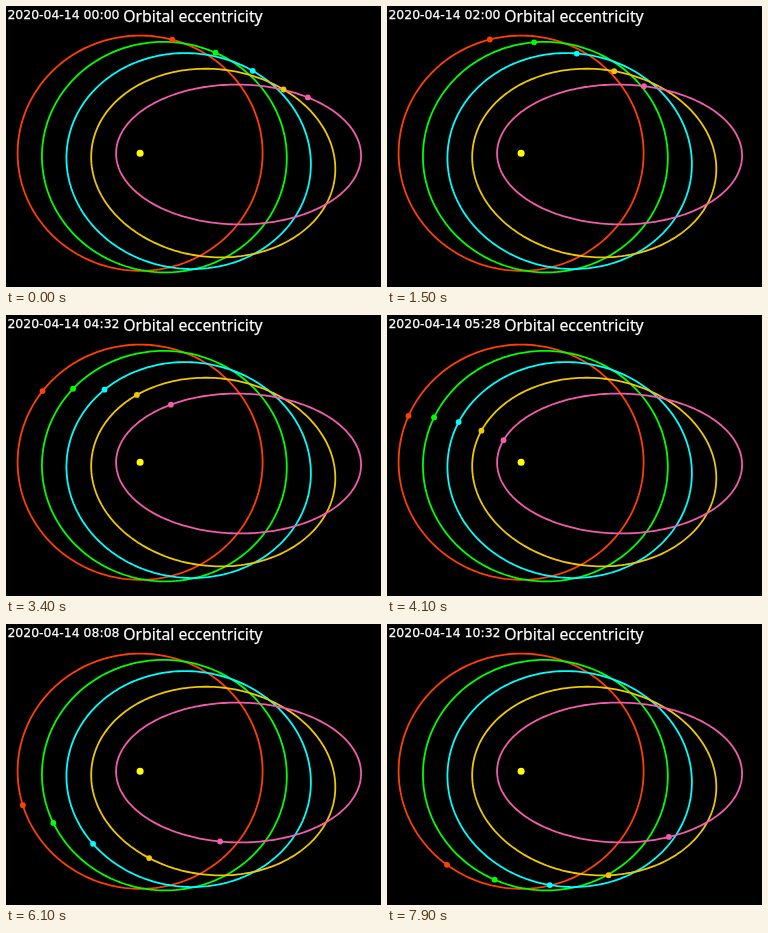
Write an HTML page that moves like this. It is 375 by 281 pixels and loops after 8 s.

```html
<!DOCTYPE html>
<html lang="en">
<head>
<meta charset="utf-8">
<title>Orbital eccentricity</title>
<style>
  html, body { margin: 0; width: 100%; height: 100%; overflow: hidden; background: #000; }
  svg { display: block; width: 100vw; height: 100vh; }
  text { fill: #fff; stroke: #fff; stroke-width: .25; }
  #clock { font: 12.45px "DejaVu Sans", sans-serif; }
  #title { font: 15.75px "Noto Sans", sans-serif; }
</style>
</head>
<body>
<svg id="stage" viewBox="0 0 375 281">
  <rect width="375" height="281" fill="#000"/>
  <text id="clock" x="1.4" y="13"></text>
  <text id="title" x="117.2" y="16">Orbital eccentricity</text>
  <g id="orbits"></g>
  <circle cx="134.1" cy="147.2" r="3.5" fill="#ff0"/>
</svg>
<script>
const LOOP = 8000, STEP = 100, MINUTES_PER_STEP = 8, DEGREES_PER_STEP = 2;
const SUN = { x: 134.1, y: 147.2 }, AXIS = 122.5, SQUASH = 0.96;
const RAD = Math.PI / 180;

// tilt: slope of the major axis; start: mean anomaly at time zero (degrees)
const orbits = [
  { color: '#ff4000', e: 0,     tilt: 0,   start: 105.2 },
  { color: '#00ff00', e: 0.201, tilt: 9.6, start: 94.2 },
  { color: '#00ffff', e: 0.402, tilt: 9.6, start: 91.6 },
  { color: '#f0c800', e: 0.603, tilt: 8,   start: 88.5 },
  { color: '#f25cae', e: 0.804, tilt: 0.8, start: 85.8 }
];

function add(tag, attributes) {
  const node = document.createElementNS('http://www.w3.org/2000/svg', tag);
  for (const name in attributes) node.setAttribute(name, attributes[name]);
  return document.getElementById('orbits').appendChild(node);
}

// Point at eccentric anomaly E, with the periapsis on the left of the sun.
function pointAt({ e, tilt }, E) {
  const u = AXIS * (e - Math.cos(E));
  const v = -AXIS * Math.sqrt(1 - e * e) * Math.sin(E);
  const c = Math.cos(tilt * RAD), s = Math.sin(tilt * RAD);
  return { x: SUN.x + u * c - v * s, y: SUN.y + SQUASH * (u * s + v * c) };
}

// Newton's method for Kepler's equation M = E - e sin E
function eccentricAnomaly(M, e) {
  let E = M + e * Math.sin(M);
  for (let i = 0; i < 12; i++) E -= (E - e * Math.sin(E) - M) / (1 - e * Math.cos(E));
  return E;
}

for (const orbit of orbits) {
  const points = Array.from({ length: 240 }, (_, i) => {
    const p = pointAt(orbit, i * 1.5 * RAD);
    return p.x.toFixed(2) + ',' + p.y.toFixed(2);
  });
  add('polygon', { points: points.join(' '), fill: 'none', stroke: orbit.color, 'stroke-width': 1.8 });
}
for (const orbit of orbits) orbit.dot = add('circle', { r: 2.9, fill: orbit.color });

const clock = document.getElementById('clock');
const pad = n => String(n).padStart(2, '0');

function draw(time) {
  const step = Math.floor((time % LOOP) / STEP);
  const minutes = step * MINUTES_PER_STEP;
  clock.textContent = `2020-04-14 ${pad(Math.floor(minutes / 60))}:${pad(minutes % 60)}`;
  for (const orbit of orbits) {
    const M = (orbit.start - step * DEGREES_PER_STEP) * RAD;
    const p = pointAt(orbit, eccentricAnomaly(M, orbit.e));
    orbit.dot.setAttribute('cx', p.x);
    orbit.dot.setAttribute('cy', p.y);
  }
}

const begin = performance.now();
function tick() {
  draw(performance.now() - begin);
  requestAnimationFrame(tick);
}
tick();
</script>
</body>
</html>
```
